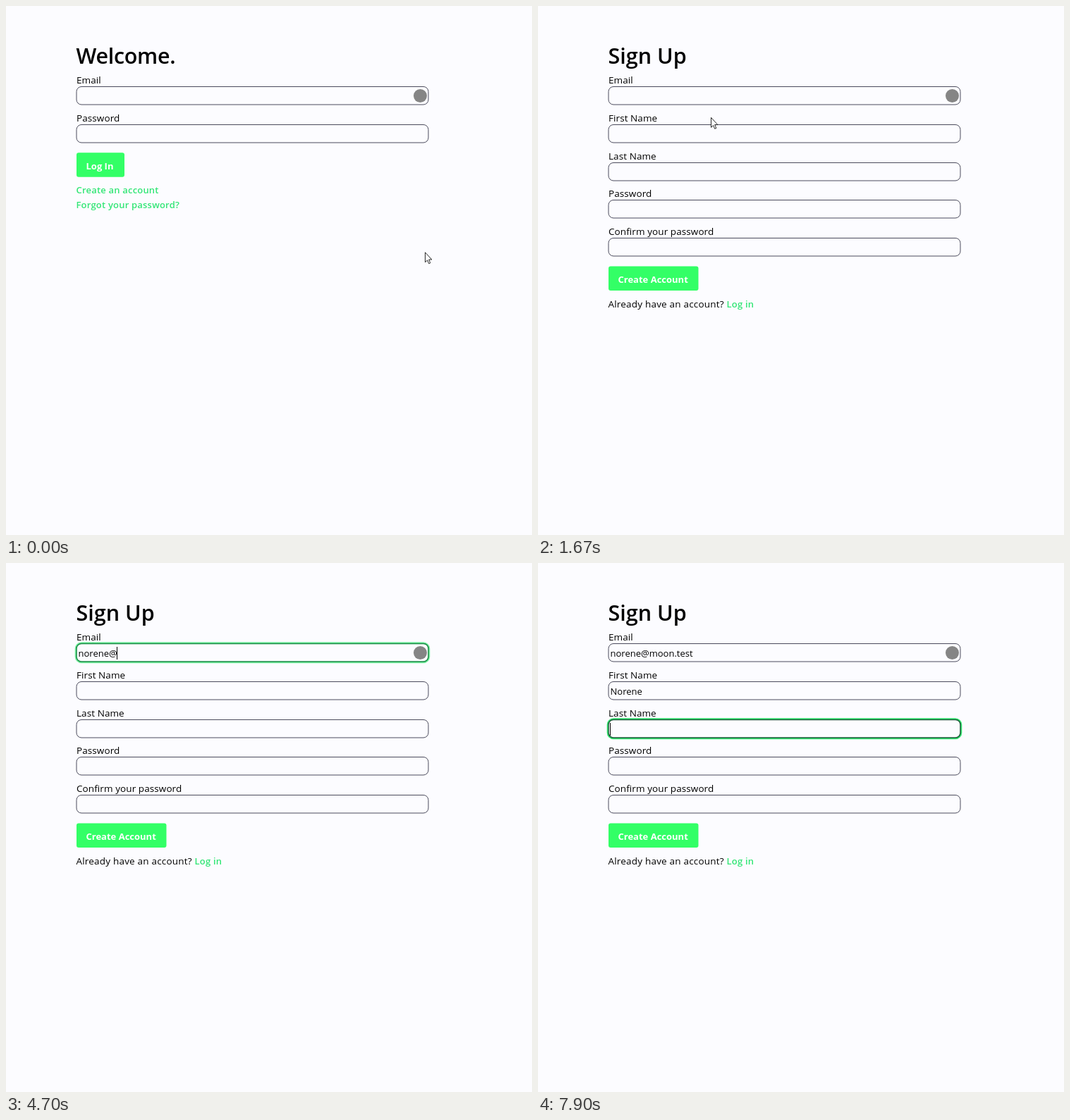
Recreate the animation shown at these times as an HTML page. Size 746 by 751 pixels, loop 8 s.

```html
<!DOCTYPE html>
<html lang="en">
<head>
<meta charset="utf-8">
<title>Sign up form</title>
<style>
  html, body { margin: 0; width: 100%; height: 100%; overflow: hidden; background: #fcfcff; }
  svg { display: block; width: 746px; height: 751px; }
  text { font-family: "Open Sans", "Noto Sans", sans-serif; font-size: 13.5px; fill: #000; white-space: pre; }
  .label { letter-spacing: .08px; }
  .note { letter-spacing: .2px; }
  .title { font-size: 30.5px; font-weight: 600; }
  .link { font-size: 13px; font-weight: 600; letter-spacing: .2px; fill: #33e676; }
  .action { font-size: 13px; font-weight: 700; fill: #fff; }
  .value { font-size: 13px; }
  .button { fill: #33ff66; }
  .box { fill: #fcfcff; stroke: #4b4b5c; }
  .halo { fill: none; stroke: #33e66f; stroke-width: 4.6; }
  .pointer { fill: #fff; stroke: #111; stroke-width: .9; stroke-linejoin: round; }
</style>
</head>
<body>
<svg id="stage" viewBox="0 0 746 751"></svg>
<script>
const NS = "http://www.w3.org/2000/svg";
const LOOP = 8000, FRAME = 1000 / 30;
const stage = document.getElementById("stage");

function add(parent, tag, attrs, content) {
  const el = document.createElementNS(NS, tag);
  for (const key in attrs) el.setAttribute(key, attrs[key]);
  if (content) el.textContent = content;
  parent.appendChild(el);
  return el;
}
const group = parent => add(parent, "g", {});
const write = (parent, cls, x, y, content) => add(parent, "text", { class: cls, x, y }, content);
const show = (el, on) => el.setAttribute("visibility", on ? "visible" : "hidden");

const rowTop = i => 114.5 + Math.round(53.83 * i);

function field(parent, i, name) {
  const top = rowTop(i);
  const shape = { x: 100, y: top, width: 499, height: 25.5, rx: 7 };
  write(parent, "label", 100, top - 4.5, name);
  const halo = add(parent, "rect", { class: "halo", ...shape });
  const box = add(parent, "rect", { class: "box", ...shape });
  const value = write(parent, "value", 102.5, top + 18.5, "");
  show(halo, false);
  return { halo, box, value };
}

function button(parent, top, width, name) {
  add(parent, "rect", { class: "button", x: 100, y: top, width, height: 34.5, rx: 3 });
  write(parent, "action", 113.5, top + 23.5, name);
}

function page(title, names) {
  const root = group(stage);
  write(root, "title", 99.5, 82, title);
  const fields = names.map((name, i) => field(root, i, name));
  add(root, "circle", { cx: 587.5, cy: 127.5, r: 9.5, fill: "#858585" });
  return { root, fields };
}

const login = page("Welcome.", ["Email", "Password"]);
login.root.firstChild.setAttribute("letter-spacing", "-.3");
button(login.root, 208.3, 68, "Log In");
write(login.root, "link", 99.5, 266, "Create an account");
write(login.root, "link", 99.5, 287, "Forgot your password?");
const underline = add(login.root, "path", { d: "M100 267.8H218.5", stroke: "#33e676" });

const signup = page("Sign Up", ["Email", "First Name", "Last Name", "Password", "Confirm your password"]);
button(signup.root, 369.6, 127.5, "Create Account");
write(signup.root, "note", 99.5, 427.5, "Already have an account?");
write(signup.root, "link", 267.5, 427.5, "Log in");

const caret = add(stage, "rect", { width: 1, height: 18, fill: "#000" });
const pointers = {
  arrow: add(stage, "path", { class: "pointer", d: "M.5 .3V14.2L3.6 11.4 5.7 16.2 7.8 15.3 5.7 10.5H9.9Z" }),
  hand: add(stage, "path", { class: "pointer", d: "M-1.5 11.5V1Q-1.5-.8 0-.8T1.5 1V6.2Q3.6 5 4.3 6.8 6 6 6.7 7.7 8.9 7.2 8.9 9.5V13.5Q8.7 16 7.3 18.5H-.3Q-2.2 15.5-5.2 11.7-5.9 10.1-4.5 9.4-3.2 9.2-1.5 11.5ZM1.5 6.2V10M4.3 6.8V10.2M6.7 7.7V10.5" }),
  beam: add(stage, "path", { d: "M-2.5-7H-.5L0-6.5.5-7H2.5M0-6.5V6.5M-2.5 7H-.5L0 6.5.5 7H2.5", fill: "none", stroke: "#111" })
};

// Typing: the time at which each character appears
const typing = [
  { row: 0, content: "norene@moon.test",
    at: [3770, 3930, 3970, 4000, 4070, 4100, 4700, 5000, 5030, 5100, 5330, 5370, 6000, 6070, 6130, 6200] },
  { row: 1, content: "Norene", at: [7330, 7400, 7470, 7530, 7570, 7630] }
];
const focusSteps = [[2300, 0], [6430, 1], [7870, 2]];
const caretOff = [[2930, 3770], [4530, 4700], [7000, 7330]];

const part = (t, from, to) => Math.min(1, Math.max(0, (t - from) / (to - from)));
const smooth = p => p * p * (3 - 2 * p);
const easeOut = (p, n) => 1 - Math.pow(1 - p, n);

function pointerAt(t) {
  if (t < 1270) {
    const p = smooth(part(t, 0, 667));
    const x = 594 - 390 * p, y = 349.5 - 95.5 * p;
    return { x, y, kind: x < 219 ? "hand" : "arrow" };
  }
  const p = part(t, 1467, 1833);
  const x = 204 + 72 * easeOut(p, 1.07), y = 254 - 132 * easeOut(p, 1.645);
  const inField = [0, 1, 2].some(i => y > rowTop(i) && y < rowTop(i) + 25.5);
  return { x, y, kind: inField ? "beam" : "arrow" };
}

function draw(t) {
  const onLogin = t < 1270;
  login.root.style.display = onLogin ? "" : "none";
  signup.root.style.display = onLogin ? "none" : "";

  const cursor = pointerAt(Math.floor((t + 1) / FRAME) * FRAME);
  for (const kind in pointers) {
    show(pointers[kind], kind === cursor.kind && t < 3770);
    pointers[kind].setAttribute("transform", `translate(${cursor.x.toFixed(1)} ${cursor.y.toFixed(1)})`);
  }
  underline.style.display = cursor.kind === "hand" ? "" : "none";

  for (const { row, content, at } of typing) {
    const value = signup.fields[row].value;
    const typed = content.slice(0, at.filter(time => time <= t).length);
    if (value.textContent !== typed) value.textContent = typed;
  }

  const step = focusSteps.filter(([time]) => time <= t).pop();
  const row = step ? step[1] : -1;
  signup.fields.forEach(({ halo, box }, i) => {
    const on = i === row;
    halo.style.display = on ? "" : "none";
    show(halo, on);
    halo.style.strokeOpacity = i === 2 ? 1 : .65;
    box.style.stroke = !on ? "" : i === 2 ? "#1a5a38" : "#178a43";
    box.style.strokeWidth = on ? 1.5 : 1;
  });

  show(caret, row >= 0 && !caretOff.some(([from, to]) => t >= from && t < to));
  if (row >= 0) {
    const value = signup.fields[row].value;
    const width = value.textContent ? value.getComputedTextLength() : 0;
    caret.setAttribute("x", Math.round(102 + width));
    caret.setAttribute("y", rowTop(row) + 4.5);
  }
}

const start = performance.now();
function tick() {
  draw((performance.now() - start) % LOOP);
  requestAnimationFrame(tick);
}
tick();
</script>
</body>
</html>
```
